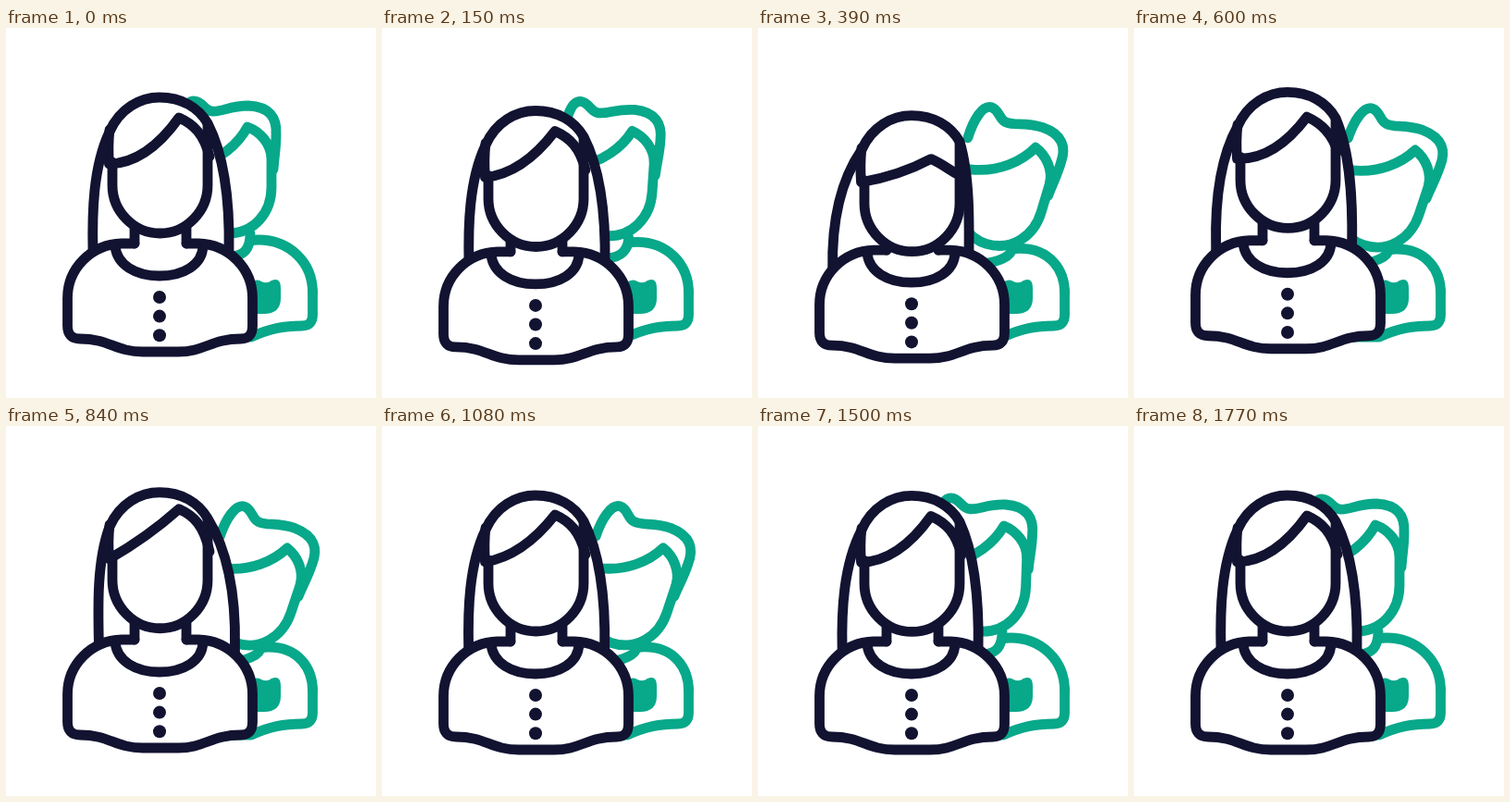
An HTML page with a canvas that plays this animation: 400 px wide and 400 px high, repeating every 3.86 s.

```html
<!DOCTYPE html>
<html lang="en">
<head>
<meta charset="utf-8">
<title>Two people</title>
<style>
html, body { margin: 0; width: 100%; height: 100%; overflow: hidden; background: #fff; }
canvas { display: block; width: 400px; height: 400px; }
</style>
</head>
<body>
<canvas id="stage" width="400" height="400"></canvas>
<script>
const LOOP = 3860, STEP = 30, REST = 1770;
const NAVY = '#121331', TEAL = '#08a88a', LINE = 10.8;
const LEAN = 18.5 * Math.PI / 180, SINK = 10;
const canvas = document.getElementById('stage');
const ctx = canvas.getContext('2d');
const ratio = window.devicePixelRatio || 1;
canvas.width = canvas.height = 400 * ratio;

// Cosine ease from 0 to 1, and a swing that eases out to 1 and back to 0.
function ease(t, from, to) {
  const u = Math.min(1, Math.max(0, (t - from) / (to - from)));
  return (1 - Math.cos(Math.PI * u)) / 2;
}
const swing = (t, from, peak, to) => ease(t, from, peak) - ease(t, peak, to);

const headDrop = t => 27.5 * swing(t, 0, 290, 570) - 7.5 * swing(t, 500, 650, 1000) + 1.5 * swing(t, 1080, 1290, 1620);
const bodyDrop = t => 14.4 * swing(t, 0, 260, 520) - 4 * swing(t, 500, 640, 1040);
const hairSway = t => -14 * swing(t, 270, 410, 740) + 6.5 * swing(t, 600, 830, 1080) - 5 * swing(t, 1040, 1280, 1770);
const fringeDrop = t => 25 * swing(t, 200, 400, 680) - 4 * swing(t, 640, 840, 1200);
const fringeSag = t => 12 - 9 * swing(t, 60, 390, 560) - 10 * swing(t, 620, 840, 1200);

const man = {
  pivot: [236.5, 246.5],
  head: [
    'M287 136V172C287 200 268 222 240 222C230 222 220 218 212 212',
    'M200 150C232 144 252 124 261 107C275 112 286 125 287 140',
    'M188 118C188 98 193 79 203 79C212 79 215 90 223 90C233 91 242 84 262 84C285 85 293 97 292 115C292 130 290 138 289 153'
  ].map(d => new Path2D(d)),
  hem: new Path2D('M331.5 284V310Q331.5 322 320 322C300 322 285 325 265 334H235'),
  pocket: new Path2D('M262 276Q272 270 276 274Q282 277 287 273Q297 269 297 281V292Q297 309 279 309H262Z')
};

const woman = {
  torso: new Path2D('M139 233H125C92 234 66.5 260 66.5 292V322Q66.5 336 80 336C112 336 118 350 148 350'
    + 'H186C215 350 222 336 254 336Q266.5 336 266.5 322V292C266.5 260 241 234 208 233H195'),
  collar: new Path2D('M118 236C120 256 140 268 166 268C192 268 212 256 213 236'),
  face: new Path2D('M115 145V170C115 198 138 222 166.5 222C195 222 218 198 218 170V104')
};

function ink(path, dy = 0, filled = false) {
  ctx.save();
  ctx.translate(0, dy);
  if (filled) {
    ctx.fillStyle = '#fff';
    ctx.fill(path);
  }
  ctx.stroke(path);
  ctx.restore();
}

function drawMan(t) {
  const lean = ease(t, 0, 490) - ease(t, 1060, 1620);
  const sink = ease(t, 0, 470) - ease(t, 1060, 1410);
  const x = 264 + 11 * sink, y = 229 + SINK * sink;
  const [px, py] = man.pivot;
  ctx.strokeStyle = ctx.fillStyle = TEAL;
  ctx.fill(man.pocket);
  ink(man.hem);
  ink(new Path2D(`M${x} ${y + 1}Q${x + 4} ${y} ${x + 9} ${y}C${x + 42} ${y} 331.5 ${y + 24} 331.5 286`));
  ink(new Path2D(`M${x} ${y - 7 + 8 * sink}C${x} ${y + 9} 258 ${y + 17 - 2 * sink} 244 ${y + 18 - 2 * sink}`));
  ctx.save();
  ctx.translate(px, py + SINK * sink);
  ctx.rotate(LEAN * lean);
  ctx.translate(-px, -py);
  man.head.forEach(part => ink(part));
  ctx.restore();
}

// Strands bend more towards their loose ends.
function hairPath(head, sway) {
  const path = new Path2D();
  const y = v => v + head;
  const left = 94 + sway, right = 241 + sway, bend = 0.6 * sway;
  path.moveTo(left, 275);
  path.lineTo(left, y(242));
  path.bezierCurveTo(left - 1, y(200), 94 + bend, y(150), 112, y(112));
  path.bezierCurveTo(123, y(87), 145, y(75), 166, y(75));
  path.bezierCurveTo(190, y(75), 208, y(86), 218, y(103));
  path.bezierCurveTo(237 + bend, y(140), right + 1, y(190), right, y(242));
  path.lineTo(right, 275);
  return path;
}

function fringePath(t) {
  const peak = 97 + fringeDrop(t), left = 147;
  const sag = (left + peak) / 2 + 2 * fringeSag(t);
  return new Path2D(`M112 110Q110 128 111.5 ${left}Q152 ${sag} 187 ${peak}C203 ${peak + 7} 214 ${peak + 18} 220 139`);
}

function drawWoman(t) {
  const head = headDrop(t), body = bodyDrop(t);
  ctx.strokeStyle = NAVY;
  ink(hairPath(head, hairSway(t)), 0, true);
  ink(woman.torso, body, true);
  ink(woman.collar, body);
  for (const x of [139, 195]) ink(new Path2D(`M${x} ${233 + body}V${216 + head}`));
  ctx.fillStyle = NAVY;
  for (let i = 0; i < 3; i++) {
    ctx.beginPath();
    ctx.arc(166, 291 + 20.6 * i + body, 7, 0, 2 * Math.PI);
    ctx.fill();
  }
  ink(woman.face, head, true);
  ink(fringePath(t), head);
}

function draw(now) {
  const t = Math.min(REST, Math.floor(now % LOOP / STEP) * STEP);
  ctx.setTransform(ratio, 0, 0, ratio, 0, 0);
  ctx.fillStyle = '#fff';
  ctx.fillRect(0, 0, 400, 400);
  ctx.lineWidth = LINE;
  ctx.lineCap = ctx.lineJoin = 'round';
  drawMan(t);
  drawWoman(t);
}

let start;
function tick(now) {
  if (start === undefined) start = now;
  draw(now - start);
  requestAnimationFrame(tick);
}
draw(0);
requestAnimationFrame(tick);
</script>
</body>
</html>
```
